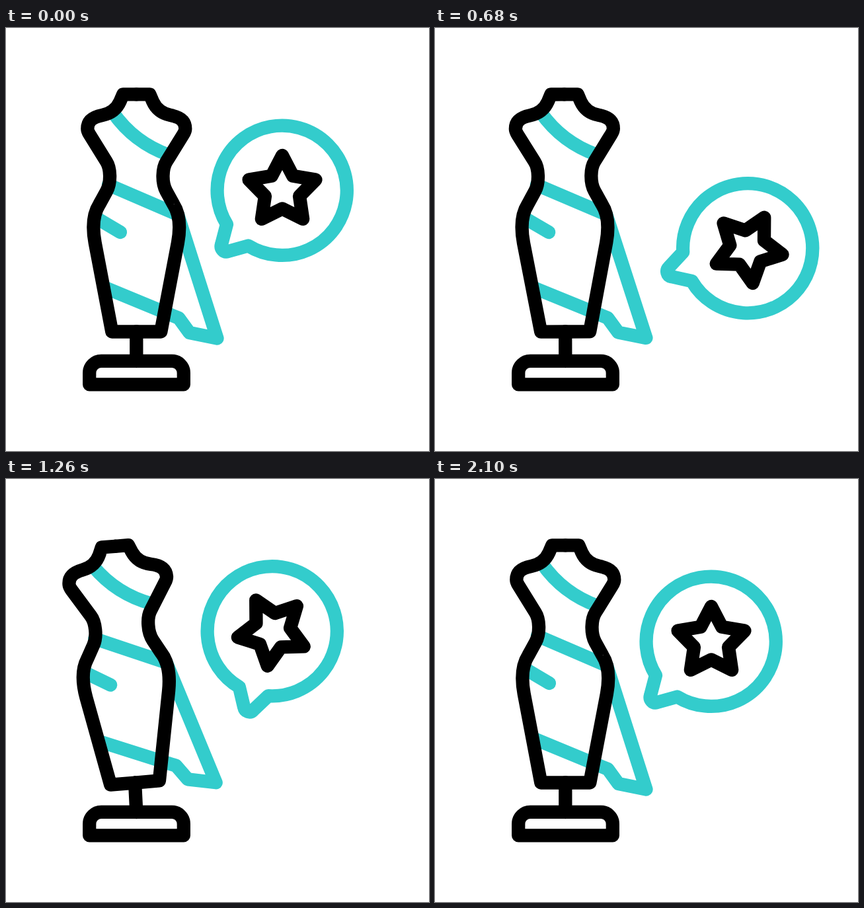
Recreate the animation shown at these times as an HTML page. Size 640 by 640 pixels, loop 2.4 s.

```html
<!DOCTYPE html>
<html lang="en">
<head>
<meta charset="utf-8">
<title>Dress form with star rating</title>
<style>
  html, body { margin: 0; width: 100%; height: 100%; overflow: hidden; background: #fff; }
  svg { display: block; width: 100vw; height: 100vh; }
  path, line, polygon { fill: none; stroke-width: 20.3; stroke-linecap: round; stroke-linejoin: round; }
  .ink { stroke: #000; }
  .teal { stroke: #3cc; }
</style>
</head>
<body>
<svg viewBox="0 0 640 640">
  <g id="form">
    <path class="teal" d="M162 128Q193.5 173 246 192"/>
    <path class="teal" d="M155 237.2L260 282.5L319.5 469.5L277.5 461L261.5 439L150 393"/>
    <path class="teal" d="M135 286.5L173 309"/>
    <!-- One side of the silhouette, measured from its axis, and its mirror image -->
    <g transform="translate(197.3)">
      <path class="ink" id="side" d="M0 100.4H20.2L24.7 111C28.7 120 36.7 129 51.7 132S74 141 74 152.5
        Q74 156 70.9 161L45.5 202C39 212 38 234 45.2 247L56.2 267C65.2 281 67.2 300 62.6 325L37 459.5H0"/>
      <use href="#side" transform="scale(-1 1)"/>
    </g>
  </g>
  <line class="ink" id="pole" x2="197.3" y2="504"/>
  <path class="ink" d="M126.2 539.4V521.8a18 18 0 0 1 18-18H250.8a18 18 0 0 1 18 18V539.4Z"/>
  <g id="bubble">
    <path class="teal" d="M-51.5 83.5A98.1 98.1 0 1 0 -84 51L-92 81.5C-94 88 -88.5 94 -82 92Z"/>
    <polygon class="ink" id="star"/>
  </g>
</svg>
<script>
const LOOP = 2400, STEP = 20;
const AXIS = 197.3, PIVOT = 486, REACH = 26.5;
const el = id => document.getElementById(id);
const place = (id, transform) => el(id).setAttribute('transform', transform);

el('star').setAttribute('points', Array.from({ length: 10 }, (_, i) => {
  const r = i % 2 ? 27.4 : 53, a = i * Math.PI / 5;
  return [r * Math.sin(a), -r * Math.cos(a)];
}).join(' '));

// Turning points: time, then the values held there. Both motions die away.
const sway = [[0, 0], [480, -17.1], [840, 11.8], [1180, -5.85], [1480, 0]];
const tilt = [[0, 0], [820, 30.4], [1180, -36.6], [1480, 12.4], [1785, -6.6], [2100, 0]];
const drift = [
  [160, 418, 246], [820, 480.6, 345], [1180, 391, 230.3],
  [1480, 460, 230], [1785, 418, 208.7], [2100, 418, 246]
];

const smooth = s => s * s * (3 - 2 * s);

function sample(keys, t) {
  const next = keys.findIndex(k => k[0] > t);
  if (next === 0) return keys[0].slice(1);
  if (next < 0) return keys.at(-1).slice(1);
  const [t0, ...from] = keys[next - 1], [t1, ...to] = keys[next];
  const p = smooth((t - t0) / (t1 - t0));
  return from.map((v, n) => v + (to[n] - v) * p);
}

function draw(t) {
  const [angle] = sample(sway, t);
  const rad = angle * Math.PI / 180;
  place('form', `rotate(${angle} ${AXIS} ${PIVOT})`);
  // The pole stays fixed in the base while its top follows the hem.
  el('pole').setAttribute('x1', AXIS + REACH * Math.sin(rad));
  el('pole').setAttribute('y1', PIVOT - REACH * Math.cos(rad));

  const [x, y] = sample(drift, t), [turn] = sample(tilt, t);
  place('bubble', `translate(${x} ${y}) rotate(${turn})`);
}

const start = performance.now();
function tick() {
  const t = (performance.now() - start) % LOOP;
  draw(Math.floor(t / STEP) * STEP);
  requestAnimationFrame(tick);
}
tick();
</script>
</body>
</html>
```
